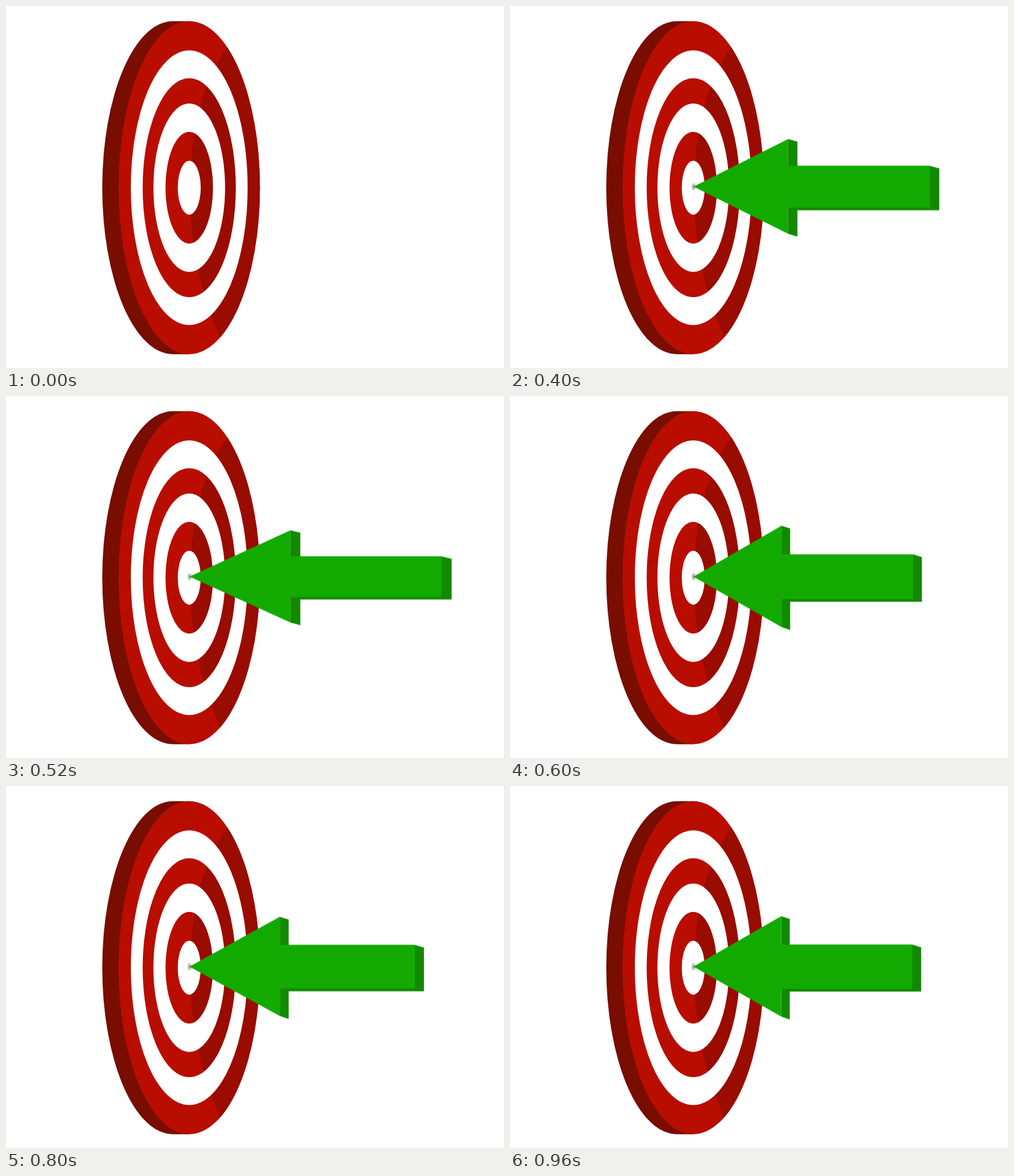
An HTML page without scripts that plays this animation: 877 by 638 pixels, repeating every 1.8 s.

```html
<!DOCTYPE html>
<html lang="en">
<head>
<meta charset="utf-8">
<title>Arrow hits target</title>
<style>
  html, body { margin: 0; width: 100%; height: 100%; overflow: hidden; background: #fff; }
  svg { display: block; width: 100%; height: 100%; }

  .arrow { animation: hit 1.8s infinite; }
  .dent { animation: dent 1.8s step-end infinite; }

  /* Fly in, squash on impact, then swing ever slower to rest, in 40 ms ticks */
  @keyframes hit {
    0% { transform: translate(1126px, 318.3px) scale(1.08, .945); animation-timing-function: step-end; }
    19.999% { transform: translate(725px, 318.3px) scale(1.08, .945); animation-timing-function: step-end; }
    22.222% { transform: translate(324px, 318.3px) scale(1.08, .945); animation-timing-function: step-end; }
    24.444% { transform: translate(324px, 318.3px) scale(.9, 1.28); animation-timing-function: steps(2); }
    28.888% { transform: translate(324px, 318.3px) scale(1.152, .92); animation-timing-function: steps(3); }
    35.555% { transform: translate(324px, 318.3px) scale(.93, 1.055); animation-timing-function: steps(4); }
    44.444% { transform: translate(324px, 318.3px) scale(1.03, .989); animation-timing-function: steps(4); }
    53.333%, 100% { transform: translate(324px, 318.3px) scale(1, 1); }
  }
  @keyframes dent {
    0% { opacity: 0; }
    22.222%, 100% { opacity: 1; }
  }
</style>
</head>
<body>
<svg viewBox="0 0 877 638" preserveAspectRatio="none">
  <defs>
    <clipPath id="face"><ellipse cx="322.7" cy="320.2" rx="124.5" ry="293.5"/></clipPath>
    <radialGradient id="grey">
      <stop offset="0" stop-color="#888"/>
      <stop offset="1" stop-color="#888" stop-opacity="0"/>
    </radialGradient>
  </defs>

  <!-- Target: rim, face, shade, white rings -->
  <path fill="#780d00" d="M322.7 26.7H294A124.5 293.5 0 0 0 294 613.7H322.7Z"/>
  <g clip-path="url(#face)">
    <path fill="#b90d00" d="M190 20H450V620H190Z"/>
    <path fill="#9a0b00" d="M394 66Q347 130 331 228Q322 300 326 375Q332 480 378 586L450 620V20Z"/>
  </g>
  <g transform="translate(322.7 320.2) scale(.425 1)" fill="none" stroke="#fff">
    <circle r="217.5" stroke-width="49"/>
    <circle r="123.5" stroke-width="50"/>
    <circle r="47.5" fill="#fff" stroke="none"/>
  </g>

  <ellipse class="dent" cx="323.5" cy="318.5" rx="5" ry="8" fill="url(#grey)"/>

  <!-- Arrow with its tip at the origin -->
  <g class="arrow">
    <path fill="#128a00" d="M153.5-88.8L168.7-84V-38.8H384.5L400-34V44H168.7V93.2L153.5 88Z"/>
    <path fill="#13aa00" d="M0-.5L153.5-88.8V-38.8H384.5V39H153.5V88L0 .5Z"/>
  </g>
</svg>
</body>
</html>
```
